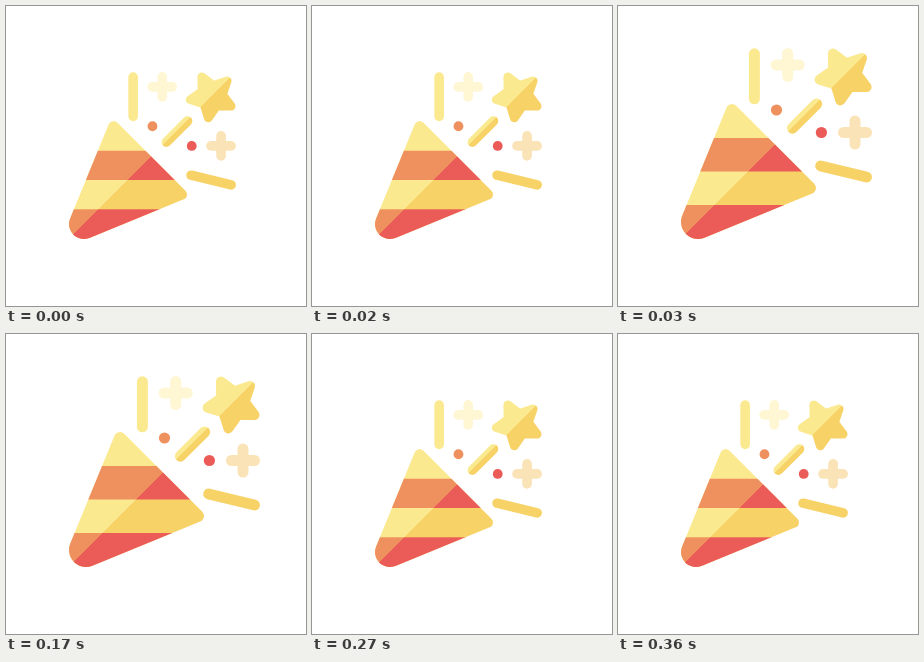
These frames come from a looping animation (300 by 300 pixels, 0.42 s). An HTML page with a canvas:

```html
<!DOCTYPE html>
<html lang="en">
<head>
<meta charset="utf-8">
<title>Party popper</title>
<style>
html, body { margin: 0; width: 100%; height: 100%; overflow: hidden; background: #fff; }
canvas { display: block; width: 300px; height: 300px; }
</style>
</head>
<body>
<canvas id="stage"></canvas>
<script>
const canvas = document.getElementById('stage');
const ctx = canvas.getContext('2d');
const dpr = window.devicePixelRatio || 1;
canvas.width = canvas.height = 300 * dpr;

const PALE = '#fbe990', GOLD = '#f7d266', ORANGE = '#ef915f', RED = '#eb5b57';
const LOOP = 420, GROW = 30, SHRINK = 270;
const PIVOT = [63, 233], SMALL = 0.874;
const rad = deg => deg * Math.PI / 180;

// Two-tone paint split along the symmetry axis x + y = 296
function split(light, dark) {
  const g = ctx.createLinearGradient(0, 0, 296, 296);
  g.addColorStop(0, light);
  g.addColorStop(0.5, light);
  g.addColorStop(0.5, dark);
  g.addColorStop(1, dark);
  return g;
}
const yellow = split(PALE, GOLD), red = split(ORANGE, RED);

function line(x1, y1, x2, y2, paint, width = 11) {
  ctx.beginPath();
  ctx.moveTo(x1, y1);
  ctx.lineTo(x2, y2);
  ctx.lineWidth = width;
  ctx.strokeStyle = paint;
  ctx.stroke();
}

function dot(x, y, color) {
  ctx.beginPath();
  ctx.arc(x, y, 5.6, 0, 2 * Math.PI);
  ctx.fillStyle = color;
  ctx.fill();
}

function plus(x, y, color) {
  const arm = 11.5;
  line(x - arm, y, x + arm, y, color);
  line(x, y - arm, x, y + arm, color);
}

function star(x, y) {
  ctx.beginPath();
  for (let i = 0; i < 10; i++) {
    const a = rad(-45 + 36 * i), r = i % 2 ? 12.5 : 25;
    ctx.lineTo(x + r * Math.cos(a), y + r * Math.sin(a));
  }
  ctx.closePath();
  ctx.lineWidth = 10;
  ctx.fillStyle = ctx.strokeStyle = yellow;
  ctx.fill();
  ctx.stroke();
}

function cone() {
  ctx.save();
  ctx.beginPath();
  ctx.arc(114, 104, 6, rad(202.3), rad(315));
  ctx.arc(192, 182, 6, rad(-45), rad(67.7));
  ctx.arc(80, 216, 17, rad(67.7), rad(202.3));
  ctx.closePath();
  ctx.clip();
  ctx.fillStyle = yellow;
  ctx.fillRect(60, 95, 145, 140);
  ctx.fillStyle = red;
  ctx.fillRect(60, 132, 145, 33.5);
  ctx.fillRect(60, 199, 145, 36);
  ctx.restore();
}

function draw(scale) {
  ctx.setTransform(dpr, 0, 0, dpr, 0, 0);
  ctx.fillStyle = '#fff';
  ctx.fillRect(0, 0, 300, 300);
  ctx.translate(...PIVOT);
  ctx.scale(scale, scale);
  ctx.translate(-PIVOT[0], -PIVOT[1]);
  ctx.lineCap = ctx.lineJoin = 'round';

  cone();
  line(136.4, 47.8, 136.4, 92.8, PALE);
  line(174.4, 122.2, 198.6, 98, yellow);
  line(202.7, 160, 248.5, 171, GOLD);
  dot(158.5, 104, ORANGE);
  dot(203.4, 126.5, RED);
  plus(169.7, 59, '#fff6d3');
  plus(237, 126.5, '#fae3b6');
  star(226.3, 69.7);
}

function tick(now) {
  const t = now % LOOP;
  draw(t >= GROW && t < SHRINK ? 1 : SMALL);
  requestAnimationFrame(tick);
}

const start = performance.now();
const run = () => {
  tick.start = start;
  requestAnimationFrame(function frame(now) {
    const t = Math.max(0, now - start) % LOOP;
    draw(t >= GROW && t < SHRINK ? 1 : SMALL);
    requestAnimationFrame(frame);
  });
};
draw(SMALL);
run();
</script>
</body>
</html>
```
